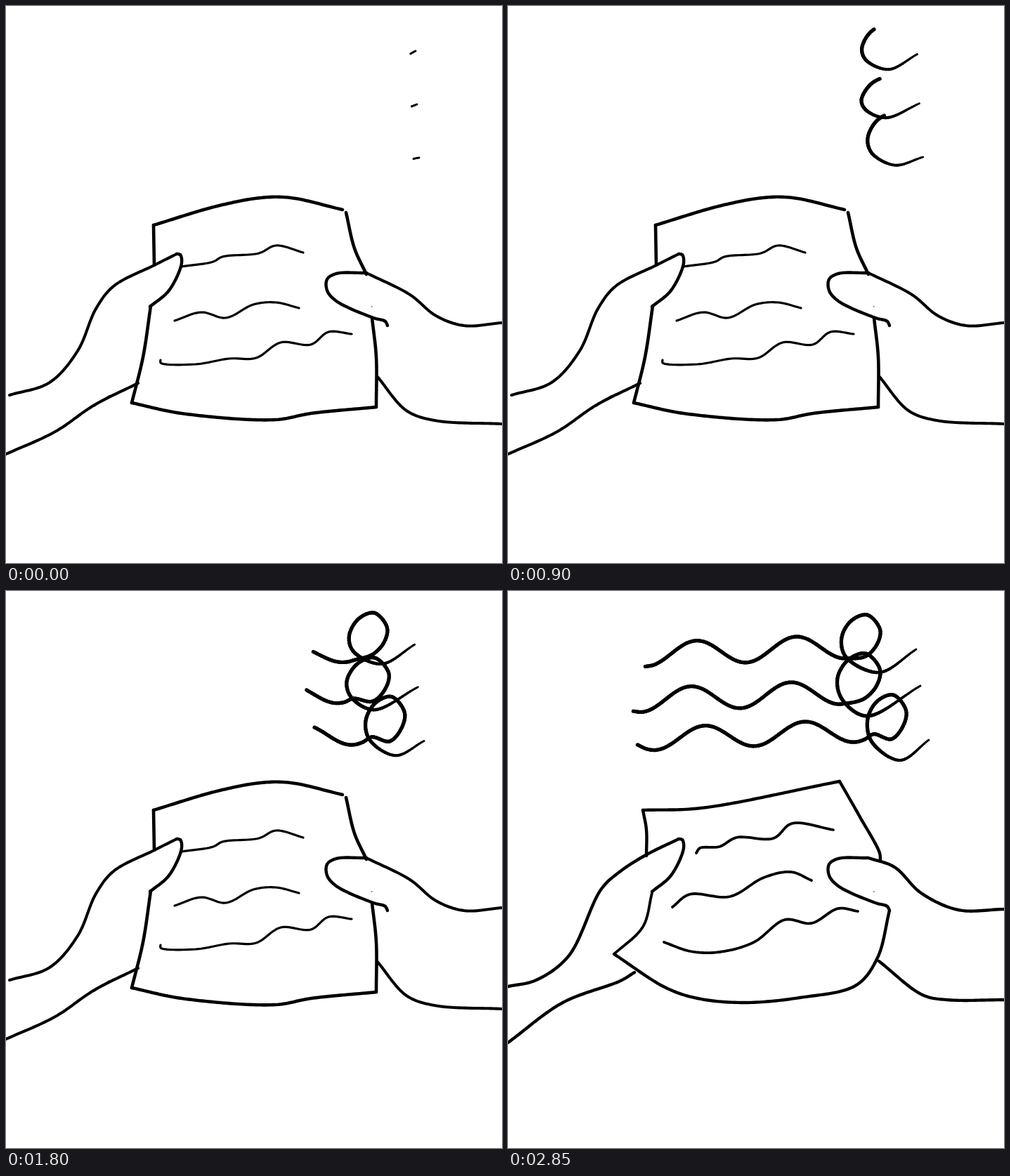
An HTML page with a canvas that plays this animation: 706x793 px, repeating every 3 s.

```html
<!DOCTYPE html>
<html lang="en">
<head>
<meta charset="utf-8">
<title>Letter in the wind</title>
<style>
  html, body { margin: 0; width: 100%; height: 100%; overflow: hidden; background: #fff; }
  canvas { display: block; }
</style>
</head>
<body>
<canvas id="stage" width="706" height="793"></canvas>
<script>
const ctx = document.getElementById('stage').getContext('2d');
const STEP = 150, STEPS = 20;

const parse = text => text.split(' ').map(pair => pair.split(',').map(Number));
const gap = (a, b) => Math.hypot(b[0] - a[0], b[1] - a[1]);
const lerp = (a, b, k) => a + (b - a) * k;
const mirror = (p, q) => [2 * p[0] - q[0], 2 * p[1] - q[1]];

// Smooth line through the knots (centripetal Catmull-Rom), sampled densely.
function curve(knots) {
  const out = [knots[0]];
  for (let i = 0; i + 1 < knots.length; i++) {
    const b = knots[i], c = knots[i + 1];
    const a = knots[i - 1] || mirror(b, c), d = knots[i + 2] || mirror(c, b);
    const ab = Math.sqrt(gap(a, b)), bc = Math.sqrt(gap(b, c)), cd = Math.sqrt(gap(c, d));
    const n = Math.max(2, Math.ceil(gap(b, c) / 4));
    for (let s = 1; s <= n; s++) {
      const u = s / n, v = 1 - u;
      out.push([0, 1].map(k => {
        const m1 = bc * ((b[k] - a[k]) / ab - (c[k] - a[k]) / (ab + bc) + (c[k] - b[k]) / bc);
        const m2 = bc * ((c[k] - b[k]) / bc - (d[k] - b[k]) / (bc + cd) + (d[k] - c[k]) / cd);
        return v * v * (1 + 2 * u) * b[k] + u * v * v * m1 + u * u * (3 - 2 * u) * c[k] - u * u * v * m2;
      }));
    }
  }
  return out;
}

const lengthOf = line => line.reduce((sum, p, i) => i ? sum + gap(line[i - 1], p) : 0, 0);
const strokes = (width, ...texts) => texts.map(text => ({ width, line: curve(parse(text)) }));

const thumbs = [
  ...strokes(4.4,
    '243,353 248,354 250,366 232,405 205,428',
    '543,455 540,449 523,444 470,420 457,405 457,389 470,381 513,380'),
  ...strokes(1, '520,428 521,428')
];

const flatPose = [
  // paper
  ...strokes(4.6,
    '211,369 210,312',
    '210,312 300,285 363,273 405,273 479,290',
    '484,294 496,345 513,382',
    '206,427 195,500 179,565',
    '179,565 250,580 383,589 434,580 527,571',
    '527,571 527,500 521,444'),
  // arms
  ...strokes(4.1,
    '5,554 62,536 102,491 128,431 153,399 211,369 243,353',
    '0,638 70,606 126,568 188,537',
    '513,380 575,411 612,441 652,455 706,451',
    '528,527 570,576 610,590 706,595'),
  // writing
  ...strokes(3.2,
    '250,371 295,364 308,357 360,352 384,341 423,351',
    '240,448 278,436 313,444 352,425 384,422 417,430',
    '220,504 220,508 270,510 318,502 356,501 391,479 434,482 459,464 492,467'),
  ...strokes(2, '125,570 147,555')
];

const bentPose = [
  // paper and arms
  ...strokes(4.4,
    '197,377 197,340 192,312',
    '192,312 275,309 472,271',
    '472,271 500,320 529,373 530,383',
    '151,517 225,565 270,580 335,586 415,579 496,561 526,522 543,455',
    '0,563 40,554 86,520 133,424 160,399 196,376 243,353',
    '0,643 78,586 160,555 180,543',
    '513,380 550,393 588,430 641,454 706,453',
    '528,527 590,575 625,582 706,582'),
  // writing
  ...strokes(3.8,
    '205,430 192,478 151,517',
    '268,373 273,366 301,364 325,351 378,352 404,331 463,340',
    '234,450 258,432 316,435 364,408 403,400 432,412',
    '222,500 260,513 301,514 350,500 394,468 432,473 470,452 498,456')
];

// A gust is a hook, a loop and a wavy tail; each value drifts from young to old.
const gusts = [
  {
    start: '583,64 581,83', hook: '546,82 528,116', centre: '540,58 503,66',
    radius: '27,32 28,32', tail: '110,4 82,17', crest: 410, end: 185
  },
  {
    start: '585,140 587,135', hook: '547,153 510,178', centre: '544,137 500,124',
    radius: '30,31 31,35', tail: '150,10 147,17', crest: 402, end: 168
  },
  {
    start: '588,216 599,212', hook: '548,222 558,241', centre: '541,190 540,182',
    radius: '29,35 28,34', tail: '214,15 202,16', crest: 422, end: 184
  }
];
const LOOP = parse('-1,0 -0.5,-0.75 0.3,-1 0.95,-0.35 0.8,0.3 0.2,0.85');
const WAVELENGTH = 142, TILT = 0.04;

function gustLine(gust, age) {
  const at = name => {
    const [young, old] = parse(gust[name]);
    return young.map((value, i) => lerp(value, old[i], age));
  };
  const hook = at('hook'), [cx, cy] = at('centre'), [rx, ry] = at('radius');
  const [base, swing] = at('tail');
  const knots = [at('start'), hook, [cx - 0.8 * rx, lerp(cy, hook[1], 0.55)]];
  LOOP.forEach(([x, y]) => knots.push([cx + x * rx, cy + y * ry]));
  for (let x = cx - 0.7 * rx; x > gust.end; x -= 12) {
    const along = gust.crest - x;
    knots.push([x, base + TILT * along - swing * Math.cos(2 * Math.PI * along / WAVELENGTH)]);
  }
  return curve(knots);
}

function drawStroke({ width, line }) {
  ctx.lineWidth = width;
  ctx.beginPath();
  line.forEach(p => ctx.lineTo(p[0], p[1]));
  ctx.stroke();
}

// Thin at the start, heavier after the first stretch, cut at the given length.
function drawGust(line, limit) {
  let run = 0;
  for (let i = 1; i < line.length && run < limit; i++) {
    const a = line[i - 1], b = line[i], size = gap(a, b);
    const k = Math.min(1, (limit - run) / size);
    ctx.lineWidth = lerp(2.9, 5.2, Math.min(1, run / 90));
    ctx.beginPath();
    ctx.moveTo(a[0], a[1]);
    ctx.lineTo(lerp(a[0], b[0], k), lerp(a[1], b[1], k));
    ctx.stroke();
    run += size;
  }
}

function drawWind(step) {
  const u = step / (STEPS - 1);
  const grown = u - 0.11 * Math.sin(1.2 * Math.PI * u);
  const age = Math.max(0, (step - 4) / 15) ** 0.7;
  gusts.forEach(gust => {
    const line = gustLine(gust, age);
    drawGust(line, 8 + grown * lengthOf(line));
  });
}

function draw(step) {
  ctx.fillStyle = '#fff';
  ctx.fillRect(0, 0, 706, 793);
  ctx.strokeStyle = '#000';
  ctx.lineCap = ctx.lineJoin = 'round';
  thumbs.forEach(drawStroke);
  (step % 2 ? bentPose : flatPose).forEach(drawStroke);
  drawWind(step);
}

const start = performance.now();
function tick() {
  draw(Math.floor((performance.now() - start) / STEP) % STEPS);
  requestAnimationFrame(tick);
}
tick();
</script>
</body>
</html>
```
